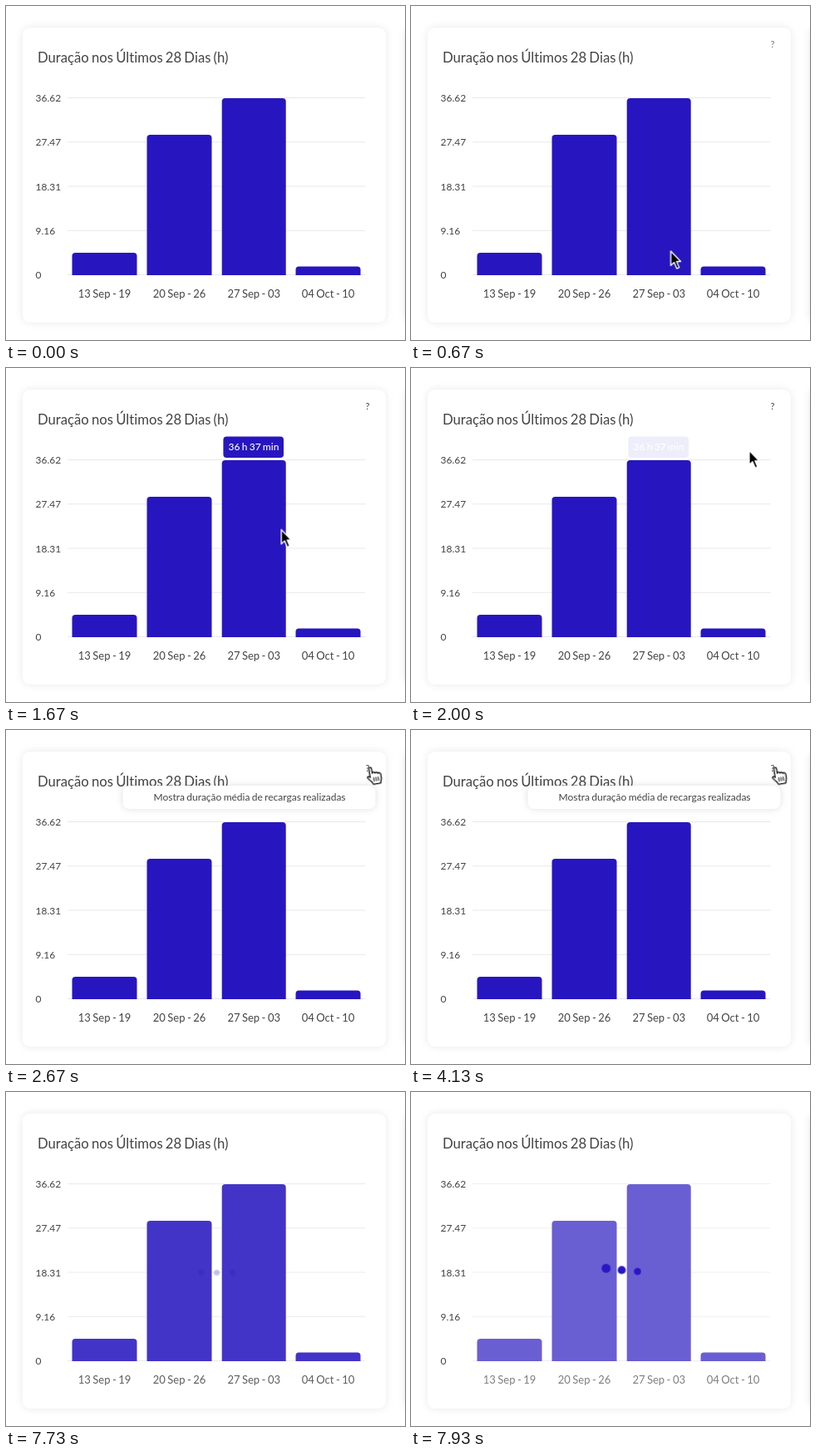
Animation of 480 by 402 pixels, one loop 8 s. Source, as an HTML page:

```html
<!DOCTYPE html>
<html lang="pt">
<head>
<meta charset="utf-8">
<title>Duração</title>
<style>
  html, body { margin: 0; width: 100%; height: 100%; overflow: hidden; background: #fff; }
  svg { display: block; position: absolute; left: 0; top: 0; width: 100%; height: 100%; overflow: hidden; }
  .card { fill: #fff; filter: drop-shadow(0 0 5px rgba(0, 0, 0, .09)); }
  text { font-family: Lato, sans-serif; font-size: 12px; fill: #444;
    word-spacing: -.065em; font-variant-ligatures: none; }
  .title { font-size: 16.7px; }
  .day { font-size: 13px; text-anchor: middle; }
  .mid { text-anchor: middle; }
  #help { font-size: 11px; }
  #tip text { fill: #fff; font-weight: 500; }
  #info rect { fill: #fff; filter: drop-shadow(0 0 4px rgba(0, 0, 0, .13)); }
</style>
</head>
<body>
<svg viewBox="0 0 480 402">
  <rect class="card" x="20" y="26" width="437" height="355" rx="9"/>
  <rect class="card" x="480" y="26" width="40" height="355" rx="9"/>
  <text class="title" x="38" y="68">Duração nos Últimos 28 Dias (h)</text>
  <g id="scale"></g>
  <g id="plot"></g>
  <g id="dots" fill="#2a17c2"></g>
  <text id="help" x="432.4" y="50">?</text>
  <g id="tip">
    <rect x="261.4" y="82.6" width="72.6" height="25.4" rx="4" fill="#2716c0"/>
    <text class="mid" x="298" y="99.3">36 h 37 min</text>
  </g>
  <g id="info">
    <rect x="140.5" y="67" width="304" height="28" rx="8"/>
    <text class="mid" x="293" y="85">Mostra duração média de recargas realizadas</text>
  </g>
  <g id="cursor" stroke-linejoin="round" stroke-linecap="round">
    <path id="arrow" d="M0 0V17.3L4 13.6L7.2 21L10.1 19.7L7 12.5H12Z" fill="#000" stroke="#fff" stroke-width="1.4"/>
    <g id="hand" fill="#fff" stroke="#000" stroke-width="1.4" transform="translate(-2.3 .2) rotate(-10 5 0) scale(.95)">
      <path d="M3.6 13.6V2.8C3.6 .2 7 .2 7 2.8V8.8C7.4 7 10.4 7.2 10.5 9.2C11.2 7.7 13.9 8.1 14 10.2C14.8 9 17.4 9.4 17.4 11.6V16C17.4 18.6 15.8 19.6 15.6 22.8H6.3C6 20.2 2.5 17.4 .6 14.2C-.6 12 1.6 10.8 3.6 13.6Z"/>
      <path d="M7.7 14.5V19M10.6 14.5V19M13.5 14.5V19" fill="none" stroke-width="1.1"/>
    </g>
  </g>
</svg>
<script>
const LOOP = 8000, FLOOR = 324;
const $ = id => document.getElementById(id);

function add(parent, tag, attrs, label) {
  const el = document.createElementNS('http://www.w3.org/2000/svg', tag);
  for (const k in attrs) el.setAttribute(k, attrs[k]);
  if (label) el.textContent = label;
  return parent.appendChild(el);
}

// Rows are [ms, value, easing]; the end values hold to the loop's edges.
function play(el, prop, rows) {
  const all = [[0, rows[0][1]], ...rows, [LOOP, rows[rows.length - 1][1]]];
  el.animate(all.map(([t, v, easing = 'linear']) => ({ offset: t / LOOP, [prop]: v, easing })),
    { duration: LOOP, iterations: Infinity });
}
const show = (el, on, off) =>
  play(el, 'opacity', [[on, 0], [on, 1], [off, 1], [off, 0]]);
const fade = (el, a, b, c, d) =>
  play(el, 'opacity', [[a, 0], [b, 1], [c, 1], [d, 0]]);
const at = (x, y, s = 1) => `translate(${x}px, ${y}px) scale(${s})`;

['36.62', '27.47', '18.31', '9.16', '0'].forEach((label, i) => {
  const y = 110.5 + i * 53.25;
  add($('scale'), 'text', { x: 35.5, y: y + 4.5 }, label);
  add($('plot'), 'path', { d: `M74 ${y}H432.5`, stroke: '#e8e8e8' });
});

[
  [79.5, 78, 297, '13 Sep - 19'],
  [169.5, 78, 155, '20 Sep - 26'],
  [259.7, 77, 111, '27 Sep - 03'],
  [348.5, 78, 313.5, '04 Oct - 10']
].forEach(([x, w, y, label]) => {
  add($('plot'), 'path', {
    d: `M${x} ${FLOOR}V${y + 4}q0-4 4-4h${w - 8}q4 0 4 4V${FLOOR}Z`, fill: '#2716c0'
  });
  add($('plot'), 'text', { class: 'day', x: x + w / 2, y: 351 }, label);
});

play($('plot'), 'opacity', [[7660, 1], [7730, .87], [7930, .69], [8000, .63]]);
play($('dots'), 'opacity', [[7660, 0], [7730, .25], [7930, 1]]);
[[234.7, 212.2, 5.4], [253.5, 214.3, 4.9], [272.5, 216, 4.3]].forEach(([x, y, r]) => {
  const dot = add($('dots'), 'circle', { r: 1 });
  play(dot, 'transform', [[7730, at(x, 217.5, 3.6)], [7930, at(x, y, r)]]);
});

play($('cursor'), 'transform', [
  [400, at(448, 404), 'cubic-bezier(.2, .4, .5, 1)'],
  [930, at(275.2, 265)],
  [1330, at(275.2, 265), 'cubic-bezier(.4, .2, .8, .8)'],
  [2000, at(406.7, 99.5)],
  [2130, at(425, 68), 'ease-out'],
  [2530, at(434.8, 44)],
  [4130, at(434.8, 44), 'ease-in'],
  [4500, at(447, 58)],
  [4900, at(484, 84)]
]);
show($('cursor'), 400, 4930);
show($('hand'), 2330, 4330);
play($('arrow'), 'opacity', [[2330, 1], [2330, 0], [4330, 0], [4330, 1]]);

fade($('help'), 500, 730, 5000, 5400);
fade($('tip'), 700, 900, 1760, 2020);
show($('info'), 2670, 4330);
</script>
</body>
</html>
```
